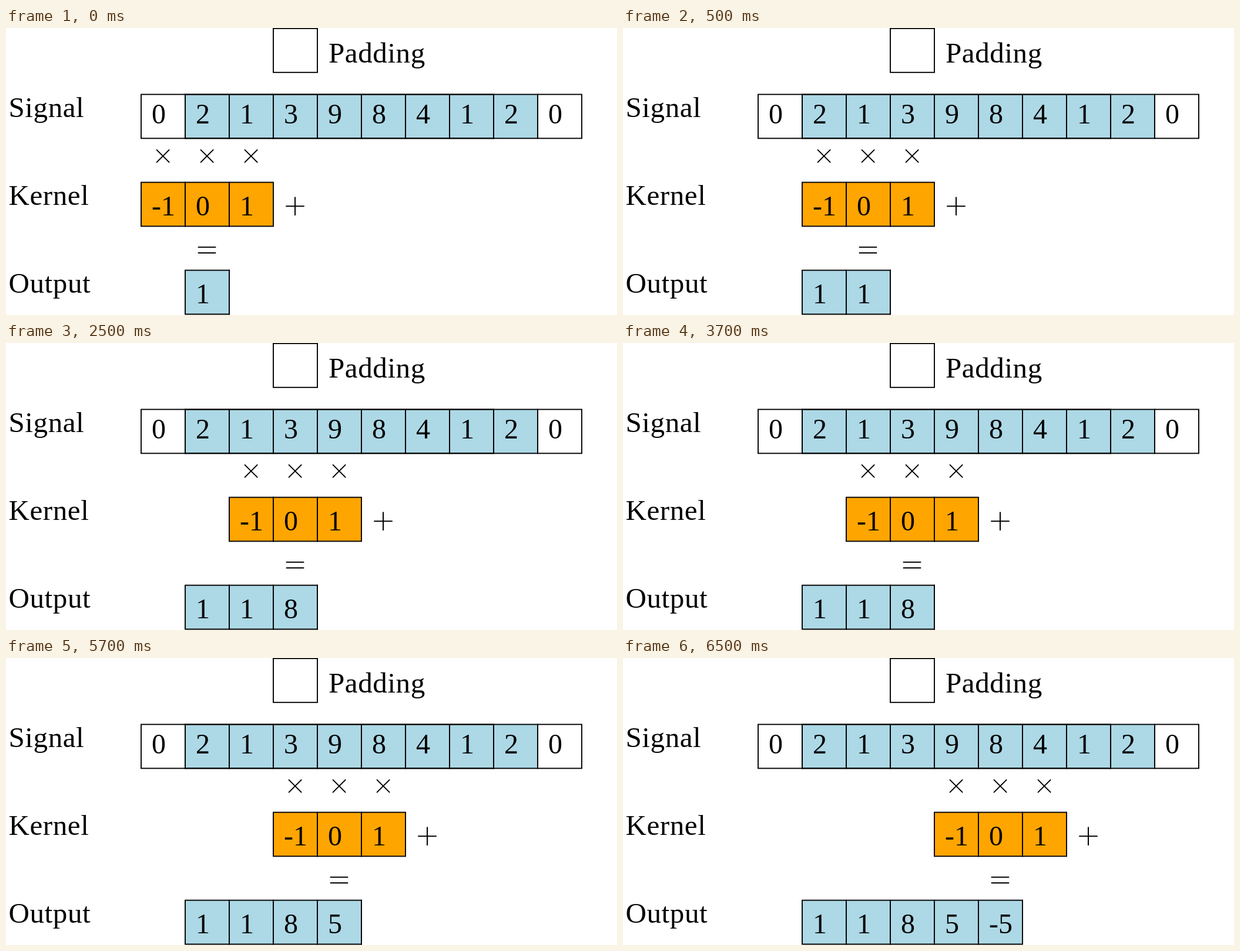
Animation, 1040 px wide and 490 px high, one loop 8000 ms. Source, as an HTML page:

```html
<!DOCTYPE html>
<html lang="en">
<head>
<meta charset="utf-8">
<title>Convolution with padding</title>
<style>
  html, body { margin: 0; width: 100%; height: 100%; overflow: hidden; background: #fff; }
  svg { display: block; width: 1040px; height: 490px; }
  text { font-family: "Liberation Serif", "Times New Roman", serif; font-size: 48px; }
  .label { font-size: 49px; letter-spacing: .6px; }
  .cell, .outline { stroke: #000; stroke-width: 1.9; }
  .outline { fill: none; }
  .sign { fill: none; stroke: #000; stroke-width: 2; stroke-linecap: round; }
  #window { animation: slide 8s step-end infinite; }
  @keyframes slide {
    0% { transform: translateX(0); }
    6.25% { transform: translateX(75px); }
    31.25% { transform: translateX(150px); }
    56.25% { transform: translateX(225px); }
    81.25%, 100% { transform: translateX(300px); }
  }
</style>
</head>
<body>
<svg viewBox="0 0 1040 490">
  <g id="still"></g>
  <g id="window"></g>
</svg>
<script>
  const SIZE = 75, LEFT = 230;
  const ROW = { padding: 0.8, signal: 113.4, kernel: 263.5, output: 413.6 };
  const BLUE = "lightblue", ORANGE = "orange", WHITE = "#fff";
  const signal = [0, 2, 1, 3, 9, 8, 4, 1, 2, 0];
  const kernel = [-1, 0, 1];
  const steps = 5;

  const column = i => LEFT + i * SIZE;

  const label = (x, y, text) => `<text class="label" x="${x}" y="${y}">${text}</text>`;

  const box = (i, y, fill) =>
    `<rect class="cell" x="${column(i)}" y="${y}" width="${SIZE}" height="${SIZE}" fill="${fill}"/>`;

  const cell = (i, y, fill, value, baseline) =>
    box(i, y, fill) + `<text x="${column(i) + 18}" y="${baseline}">${value}</text>`;

  const sign = d => `<path class="sign" d="${d}"/>`;
  const times = i => sign(`M${column(i) + 26.6} 208.1l21 21m0-21l-21 21`);

  const lastCell = signal.length - 1;
  const signalCells = signal.map((v, i) =>
    cell(i, ROW.signal, i % lastCell ? BLUE : WHITE, v, 163));

  const outputCells = Array.from({ length: steps }, (_, i) => {
    const sum = kernel.reduce((total, k, j) => total + k * signal[i + j], 0);
    return cell(i + 1, ROW.output, BLUE, sum, 470);
  });

  document.getElementById("still").innerHTML = [
    box(3, ROW.padding, WHITE),
    label(549, 58.5, "Padding"),
    label(4.5, 152, "Signal"),
    label(4.5, 302, "Kernel"),
    label(4.5, 452, "Output"),
    ...signalCells,
    `<rect class="outline" x="${column(1)}" y="${ROW.signal}" width="${7 * SIZE}" height="${SIZE}"/>`,
    ...outputCells
  ].join("");

  // The white cover hides results that are not computed yet.
  document.getElementById("window").innerHTML = [
    `<rect x="${column(2) + 1}" y="411" width="400" height="79" fill="${WHITE}"/>`,
    ...kernel.map((v, i) => cell(i, ROW.kernel, ORANGE, v, 320) + times(i)),
    sign("M477 304.3h30m-15-15v30"),
    sign("M327.5 374.3h29m-29 9.8h29")
  ].join("");
</script>
</body>
</html>
```
